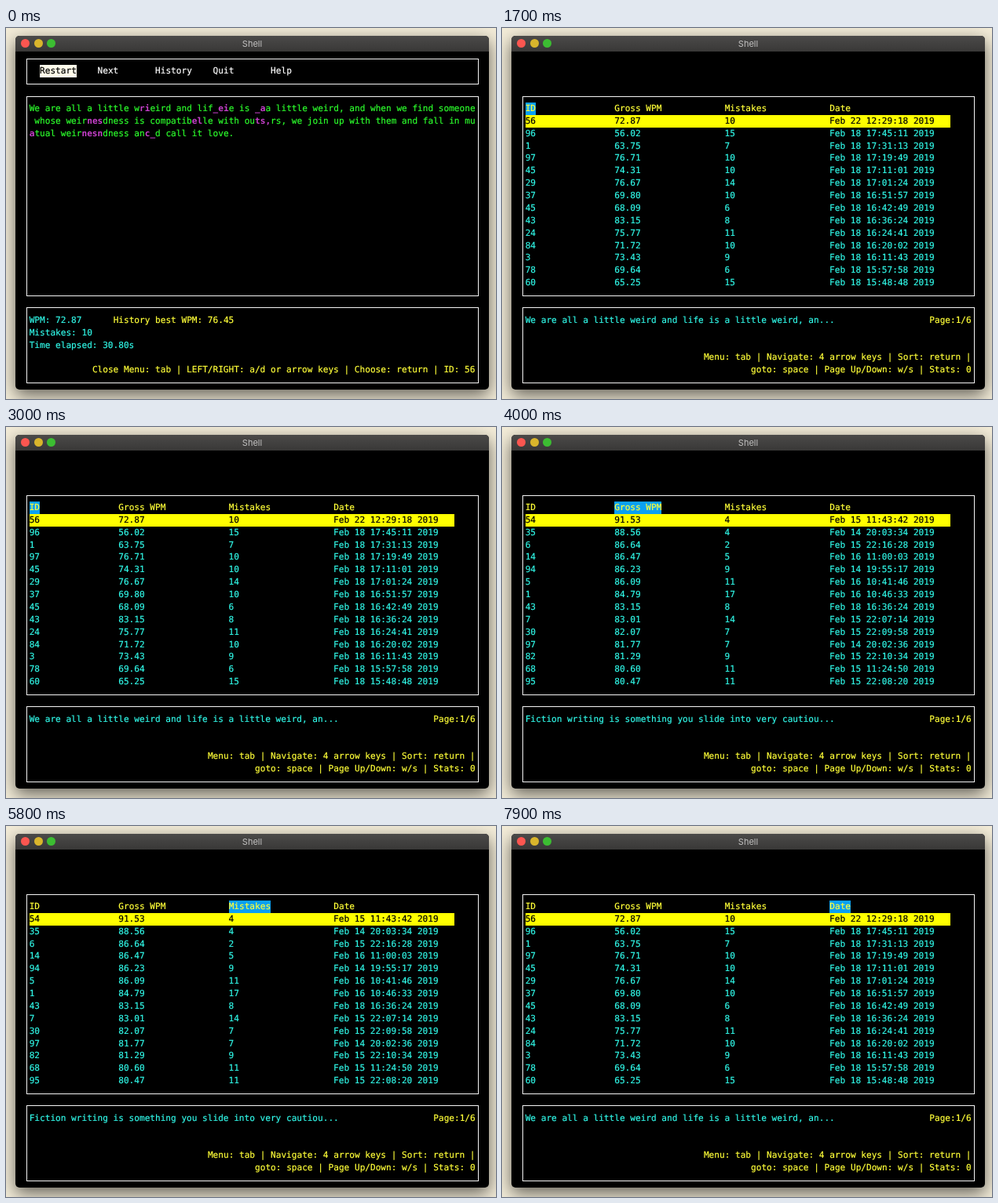
Write an HTML page that moves like this. It is 624x473 px and loops after 8 s.

```html
<!DOCTYPE html>
<html lang="en">
<head>
<meta charset="utf-8">
<title>Shell</title>
<style>
html, body { margin: 0; width: 100%; height: 100%; overflow: hidden; }
body { background: #f3ecd8; }
.shadow, .window {
  position: absolute; left: 12px; top: 10px; width: 603px; height: 451px; border-radius: 5px;
}
.shadow { box-shadow: 0 7px 21px rgba(0, 0, 0, .6); }
.window { background: #000; overflow: hidden; }
.bar {
  height: 20px; background: linear-gradient(#4b4a49, #393837);
  color: #c2c1c0; font: 11px/20px Inter, Roboto, sans-serif; text-align: center;
}
.bar i { position: absolute; top: 4px; width: 11px; height: 11px; border-radius: 50%; }
#screen {
  position: absolute; inset: 0;
  font: 11.1px/15.87px "DejaVu Sans Mono", monospace;
  text-rendering: geometricPrecision;
  -webkit-text-stroke: .2px;
}
#screen span { position: absolute; white-space: pre; height: 15.87px; }
#screen div { position: absolute; box-sizing: border-box; border: 1.5px solid #f4f4f4; }
.green { color: #2cfc2c; }
.cyan { color: #30f6e6; }
.yellow { color: #ffff38; }
.typo { color: #c840cc; font-weight: bold; -webkit-text-stroke: 0; }
.white { color: #fff; }
.chosen { color: #000; background: #fffbea; }
.row { color: #000; background: #ff0; }
.cursor { color: #ffff38; background: #0aa0f2; }
</style>
</head>
<body>
<div class="shadow"></div>
<div class="window">
  <div class="bar">
    <i style="left:6.5px;background:#fb5650"></i>
    <i style="left:23.5px;background:#d9b52c"></i>
    <i style="left:40px;background:#3cbd32"></i>
    Shell
  </div>
</div>
<div id="screen"></div>
<script>
const CELL = 6.683, LINE = 15.87, LEFT = 29.7, TOP = 95, COLS = 85, PAGE = 14, LOOP = 8000;
const screen = document.getElementById('screen');

let seed = 56;
const random = () => (seed = seed * 16807 % 2147483647) / 2147483647;
const spread = (low, high) => low + (high - low) * (random() + random()) / 2;

// Typing sessions: number of runs, latest run, seconds between runs
const runs = [];
function session(count, day, gap, id, wpm, mistakes) {
  let time = Date.parse(`2019-02-${day}Z`);
  for (let i = 0; i < count; i++) {
    runs.push({ id, wpm, mistakes, time });
    id = Math.floor(random() * 98);
    wpm = spread(58, 88);
    mistakes = Math.floor(spread(3, 19));
    time -= gap * spread(.3, 1.7) * 1000;
  }
}
session(1, '22T12:29:18', 0, 56, 72.87, 10);
session(13, '18T17:45:11', 630, 96, 56.02, 15);
session(14, '16T11:00:03', 300, 14, 86.47, 5);
session(14, '15T22:16:28', 50, 6, 86.64, 2);
session(14, '15T22:04:09', 216, 67, 77.66, 5);
session(14, '15T11:43:42', 110, 54, 91.53, 4);
session(14, '14T20:03:34', 60, 35, 88.56, 4);

const view = (quote, order = (a, b) => b.time - a.time, page = 1) =>
  ({ quote, page, rows: [...runs].sort(order).slice((page - 1) * PAGE, page * PAGE) });
const newest = view('We are all a little weird and life is a little weird, an...');
const older = view('You gain strength, courage, and confidence by every expe...', undefined, 4);
const fastest = view('Fiction writing is something you slide into very cautiou...',
  (a, b) => b.wpm - a.wpm);
const cleanest = view('If you treat an individual as he is, he will remain how ...',
  (a, b) => a.mistakes - b.mistakes || a.wpm - b.wpm);

const put = (row, col, text, style) =>
  `<span class="${style}" style="left:${LEFT + col * CELL}px;top:${TOP + row * LINE}px">${text}</span>`;
const putRight = (row, text, style) => put(row, COLS - text.length, text, style);
const box = (from, to) =>
  `<div style="left:26px;width:576px;top:${TOP + (from + .5) * LINE - .5}px;height:${(to - from) * LINE + 1.5}px"></div>`;

// Mistyped parts stand between asterisks
const typed = [
  'We are all a little w*ri*eird and lif*_ei*e is *_a*a little weird, and when we find someone',
  ' whose weir*nes*dness is compatib*el*le with ou*ts,*rs, we join up with them and fall in mu',
  '*a*tual weir*nesn*dness an*c_*d call it love.'
];

function menuScreen(choice) {
  let html = box(-4, -2);
  ['Restart', 'Next', 'History', 'Quit', 'Help'].forEach((item, i) =>
    html += put(-3, 2 + 11 * i, item, i === choice ? 'chosen' : 'white'));
  typed.forEach((line, row) => {
    let col = 0;
    line.split('*').forEach((part, i) => {
      html += put(row, col, part, i % 2 ? 'typo' : 'green');
      col += part.length;
    });
  });
  return html
    + put(17, 0, 'WPM: 72.87', 'cyan') + put(17, 16, 'History best WPM: 76.45', 'yellow')
    + put(18, 0, 'Mistakes: 10', 'cyan') + put(19, 0, 'Time elapsed: 30.80s', 'cyan')
    + putRight(21, 'Close Menu: tab | LEFT/RIGHT: a/d or arrow keys | Choose: return | ID: 56', 'yellow');
}

function runLine({ id, wpm, mistakes, time }) {
  const iso = new Date(time).toISOString();
  const date = `Feb ${iso.slice(8, 10)} ${iso.slice(11, 19)} 2019`;
  return `${id}`.padEnd(17) + wpm.toFixed(2).padEnd(21) + `${mistakes}`.padEnd(20) + date.padEnd(23);
}

function historyScreen({ rows, page, quote }, cursor) {
  const starts = [0, 17, 38, 58];
  let html = '';
  ['ID', 'Gross WPM', 'Mistakes', 'Date'].forEach((name, i) =>
    html += put(0, starts[i], name, i === cursor ? 'cursor' : 'yellow'));
  rows.forEach((run, i) => html += put(i + 1, 0, runLine(run), i ? 'cyan' : 'row'));
  return html
    + put(17, 0, quote, 'cyan') + putRight(17, `Page:${page}/6`, 'yellow')
    + putRight(20, 'Menu: tab | Navigate: 4 arrow keys | Sort: return |', 'yellow')
    + putRight(21, 'goto: space | Page Up/Down: w/s | Stats: 0', 'yellow');
}

const scenes = [
  [0, () => menuScreen(0)],
  [400, () => menuScreen(1)],
  [600, () => menuScreen(2)],
  [1000, () => historyScreen(newest, 0)],
  [1800, () => historyScreen(older, 0)],
  [2600, () => historyScreen(newest, 0)],
  [3500, () => historyScreen(newest, 1)],
  [4000, () => historyScreen(fastest, 1)],
  [5600, () => historyScreen(fastest, 2)],
  [6000, () => historyScreen(cleanest, 2)],
  [7100, () => historyScreen(cleanest, 3)],
  [7500, () => historyScreen(newest, 3)]
];

let shown, start;
function tick(now) {
  start ??= now;
  const time = (now - start) % LOOP;
  const scene = scenes.findLast(([from]) => from <= time);
  if (scene !== shown) {
    shown = scene;
    screen.innerHTML = box(-1, 15) + box(16, 22) + scene[1]();
  }
  requestAnimationFrame(tick);
}
tick(performance.now());
</script>
</body>
</html>
```
